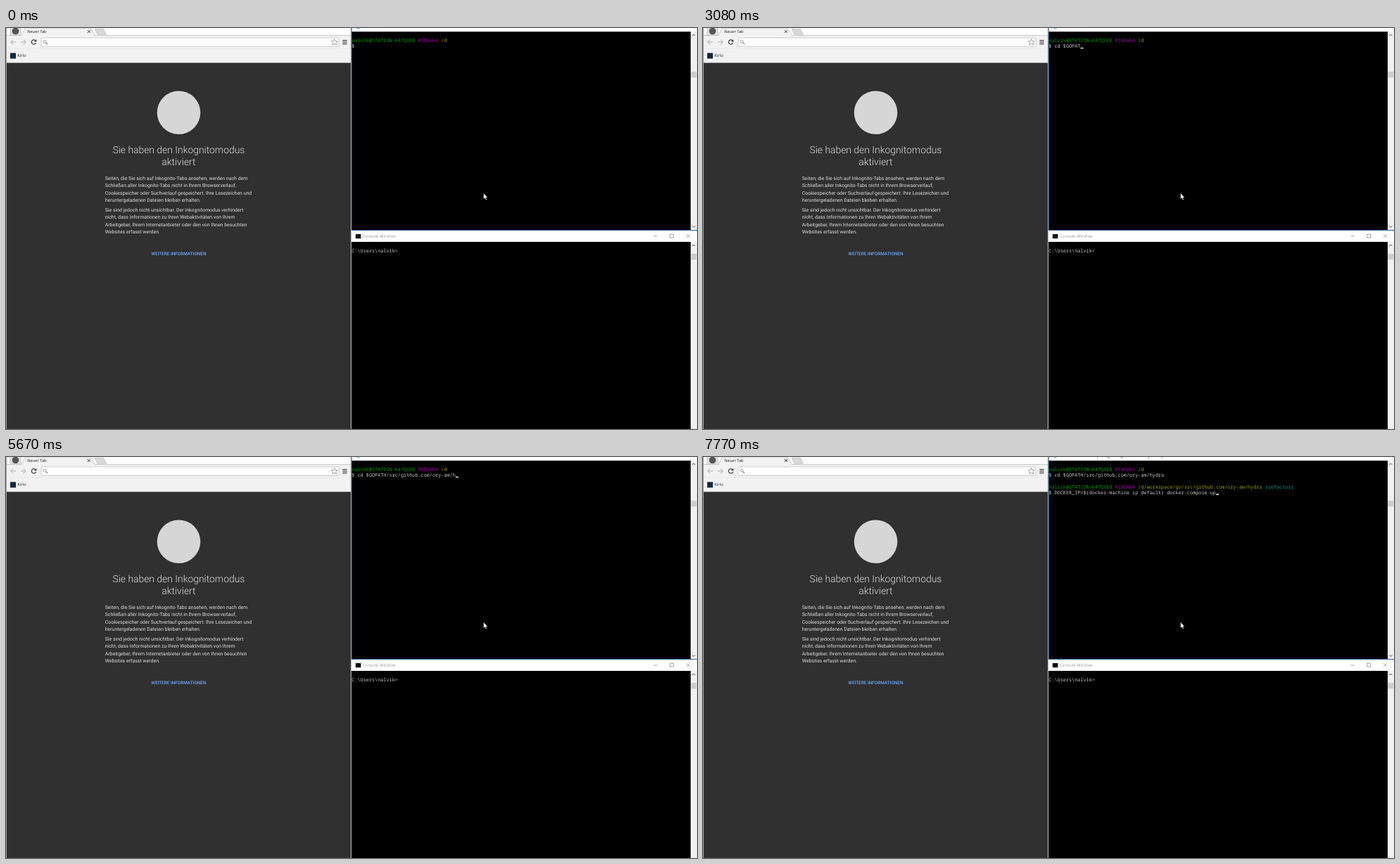
An HTML page for the animation above (8 s loop, 982 by 570 pixels).

```html
<!DOCTYPE html>
<html lang="de">
<head>
<meta charset="utf-8">
<title>Terminal</title>
<style>
  html, body { margin: 0; width: 100%; height: 100%; overflow: hidden; background: #fff; }
  svg { display: block; width: 982px; height: 570px; }
  text { text-rendering: geometricPrecision; white-space: pre; }
  .ui { font: 5.8px "Open Sans", sans-serif; fill: #222; }
  .page { font: 6.96px Roboto, sans-serif; fill: #dedede; }
  .head { font: 300 13.9px Roboto, sans-serif; fill: #dedede; text-anchor: middle; }
  .link { font: 500 6.4px Roboto, sans-serif; fill: #6aaaf8; text-anchor: middle; }
  .term { font: 6.833px "Noto Sans Mono", monospace; fill: #c8c8c8; }
  .user { fill: #00a000; }
  .sys { fill: #a000a0; }
  .path { fill: #a0a000; }
  .branch { fill: #00a0a0; }
  .line { fill: none; stroke: #777; stroke-width: .7; }
</style>
</head>
<body>
<svg viewBox="0 0 982 570">
  <!-- browser -->
  <rect width="491" height="12" fill="#fdfdfd"/>
  <path d="M5 0H22V11H5Z" fill="#dcdcdc"/>
  <circle cx="13.5" cy="4.5" r="4.8" fill="#555"/>
  <path d="M126 1.2H138.5L142.5 9.3H130Z" fill="#d8d8d8" stroke="#b8b8b8" stroke-width=".6"/>
  <rect y="10.6" width="490" height="39.4" fill="#f2f2f2"/>
  <path d="M0 10.6H22L27.5 0H120L126 10.6H490" fill="#f2f2f2" stroke="#b4b4b4" stroke-width=".7"/>
  <rect x="23" y="10" width="102" height="2" fill="#f2f2f2"/>
  <text class="ui" x="30.3" y="7.2" style="font-size:5.7px">Neuer Tab</text>
  <path d="M115.8 3L119.8 7M119.8 3L115.8 7" stroke="#444" stroke-width="1" fill="none"/>
  <g fill="none" stroke="#c4c4c4" stroke-width="1.3">
    <path d="M14 20H7M10 16.8L6.8 20L10 23.2"/>
    <path d="M21 20H28M25 16.8L28.2 20L25 23.2"/>
  </g>
  <path d="M42 17.9A3.2 3.2 0 1 0 42.6 21" fill="none" stroke="#444" stroke-width="1.3"/>
  <path d="M43.4 16V19.6H39.8Z" fill="#444"/>
  <rect x="50" y="14" width="423" height="12.3" rx="1" fill="#fff" stroke="#b8b8b8" stroke-width=".7"/>
  <circle cx="55.2" cy="19.2" r="1.9" class="line"/>
  <path d="M56.6 20.6L59.2 23.3" stroke="#777" stroke-width="1.1"/>
  <path d="M466.7 15.6L468 18.6L471.2 18.9L468.8 21L469.5 24.2L466.7 22.5L463.9 24.2L464.6 21L462.2 18.9L465.4 18.6Z" class="line"/>
  <path d="M478.2 17.6H484.6M478.2 20.1H484.6M478.2 22.6H484.6" stroke="#444" stroke-width="1.3"/>
  <path d="M0 29.3H490" stroke="#e0e0e0" stroke-width=".6"/>
  <rect x="6" y="35.5" width="8" height="8" fill="#15273f"/>
  <text class="ui" x="16.3" y="41.4">Kirlo</text>
  <rect y="49.5" width="490" height="521" fill="#303030"/>
  <path d="M.5 0V570M490.3 0V570" stroke="#a0a0a0" stroke-width="1"/>

  <circle cx="245.5" cy="120.3" r="30.8" fill="#d6d6d6"/>
  <g class="head">
    <text x="245.4" y="178">Sie haben den Inkognitomodus</text>
    <text x="245.4" y="194.6">aktiviert</text>
  </g>
  <g class="page" id="page"></g>
  <text class="link" x="245.4" y="323.1">WEITERE INFORMATIONEN</text>

  <!-- upper terminal -->
  <rect x="491" width="491" height="5.3" fill="#fff"/>
  <circle cx="500.5" cy="-2.4" r="3.4" fill="#35b5c5"/>
  <text class="ui" id="title" x="507" y="-.4"></text>
  <rect x="491" y="5.2" width="482" height="282" fill="#000"/>
  <rect x="973" y="5.2" width="9" height="282" fill="#f0f0f0"/>
  <rect x="973.3" y="62" width="8" height="8.4" fill="#cdcdcd"/>
  <path d="M975.3 11L977.3 9L979.3 11M975.3 281.5L977.3 283.5L979.3 281.5" class="line" style="stroke:#444;stroke-width:1"/>
  <path d="M491.2 0V287.5H982" fill="none" stroke="#2a6596" stroke-width="1"/>
  <g class="term">
    <text x="491.3" y="20"><tspan class="user">nalvik@STATION-K47QXEB</tspan> <tspan class="sys">MINGW64</tspan> <tspan class="path">/d</tspan></text>
    <text id="cmd1" x="491.3" y="28.2"></text>
    <text id="prompt" x="491.3" y="44.7"><tspan class="user">nalvik@STATION-K47QXEB</tspan> <tspan class="sys">MINGW64</tspan> <tspan class="path">/d/workspace/go/src/github.com/ory-am/hydra</tspan> <tspan class="branch">(refactor)</tspan></text>
    <text id="cmd2" x="491.3" y="52.8"></text>
  </g>
  <rect id="caret" width="4.1" height="1.8" fill="#c8c8c8"/>
  <path d="M678.7 234.8V243.2L680.6 241.5L682 244.6L683.3 244L682 241H684.5Z" fill="#fff" stroke="#000" stroke-width=".4"/>

  <!-- lower terminal -->
  <rect x="491" y="288.2" width="491" height="16" fill="#fff"/>
  <rect x="496.8" y="293" width="7.6" height="6.2" fill="#111"/>
  <text class="ui" x="507" y="298.3" style="font-size:6px;fill:#999">Console Window</text>
  <path d="M920.5 296H925.5M943.7 293.2H948.7V298.2H943.7ZM967 293.2L972 298.2M972 293.2L967 298.2" class="line"/>
  <rect x="491" y="304" width="482" height="266" fill="#000"/>
  <rect x="973" y="304" width="9" height="266" fill="#f0f0f0"/>
  <rect x="973.3" y="321" width="8" height="8.4" fill="#cdcdcd"/>
  <path d="M975.3 310L977.3 308L979.3 310" class="line" style="stroke:#444;stroke-width:1"/>
  <text class="term" x="491.3" y="319.2">C:\Users\nalvik&gt;</text>
</svg>
<script>
const LOOP = 8000, LEFT = 491.3, CELL = 4.1;
const $ = id => document.getElementById(id);

const paragraphs = [
  [216.1, ["Seiten, die Sie sich auf Inkognito-Tabs ansehen, werden nach dem",
    "Schließen aller Inkognito-Tabs nicht in Ihrem Browserverlauf,",
    "Cookiespeicher oder Suchverlauf gespeichert. Ihre Lesezeichen und",
    "heruntergeladenen Dateien bleiben erhalten."]],
  [261.2, ["Sie sind jedoch nicht unsichtbar. Der Inkognitomodus verhindert",
    "nicht, dass Informationen zu Ihren Webaktivitäten von Ihrem",
    "Arbeitgeber, Ihrem Internetanbieter oder den von Ihnen besuchten",
    "Websites erfasst werden."]]
];
for (const [top, lines] of paragraphs) {
  lines.forEach((line, i) => {
    const el = document.createElementNS("http://www.w3.org/2000/svg", "text");
    el.setAttribute("x", 140.7);
    el.setAttribute("y", top + i * 10.24);
    el.textContent = line;
    $("page").append(el);
  });
}

const first = "cd $GOPATH/src/github.com/ory-am/hydra";
const second = "DOCKER_IP=$(docker-machine ip default) docker-compose up";

// Typing: time, characters typed, caret visible
const typing = [
  [0, 0, 0], [140, 0, 1],
  [560, 1, 1], [700, 2, 1], [840, 3, 1], [910, 4, 1], [1050, 5, 1],
  [1400, 5, 0], [1470, 4, 1], [1610, 5, 1], [1680, 6, 1], [2030, 6, 0],
  [2450, 6, 1], [2590, 7, 1], [2870, 7, 0], [2940, 8, 1], [3080, 9, 1],
  [3150, 10, 1], [3290, 11, 1], [3360, 11, 0],
  [3500, 12, 1], [3640, 13, 1], [3710, 14, 1], [3850, 15, 1],
  [4060, 16, 1], [4130, 17, 1], [4200, 18, 1], [4410, 26, 0],
  [4760, 27, 1], [4830, 28, 1], [4970, 29, 1], [5110, 33, 1], [5390, 33, 0],
  [5670, 34, 1], [5740, 35, 1], [5810, 36, 1], [5880, 37, 1], [5950, 38, 1],
  [6300, 38, 0]
];
const ENTER = 6510, PROMPT = 6650, RECALL = 7210;
// Caret after the first command: time, visible
const blinks = [[ENTER, 1], [6790, 0], [RECALL, 1], [7280, 0], [7770, 1]];

const at = (steps, t) => steps.findLast(s => s[0] <= t);

function setText(id, value) {
  const el = $(id);
  if (el.textContent !== value) el.textContent = value;
}

function draw(t) {
  const [, typed, caretOn] = at(typing, t);
  const ready = t >= PROMPT, recalled = t >= RECALL;
  let col = 2 + typed, row = 0, on = caretOn;
  if (t >= ENTER) {
    col = ready ? 2 + (recalled ? second.length : 0) : 0;
    row = ready ? 3 : 2;
    on = at(blinks, t)[1];
  }
  setText("cmd1", "$ " + first.slice(0, typed));
  setText("cmd2", ready ? "$ " + (recalled ? second : "") : "");
  setText("title", "MINGW64:/d" + (ready ? "/workspace/go/src/github.com/ory-am/hydra" : ""));
  $("prompt").style.visibility = ready ? "visible" : "hidden";
  const caret = $("caret");
  caret.setAttribute("x", LEFT + col * CELL);
  caret.setAttribute("y", 27.7 + row * 8.2);
  caret.style.visibility = on ? "visible" : "hidden";
}

const start = performance.now();
function tick() {
  draw((performance.now() - start) % LOOP);
  requestAnimationFrame(tick);
}
tick();
</script>
</body>
</html>
```
